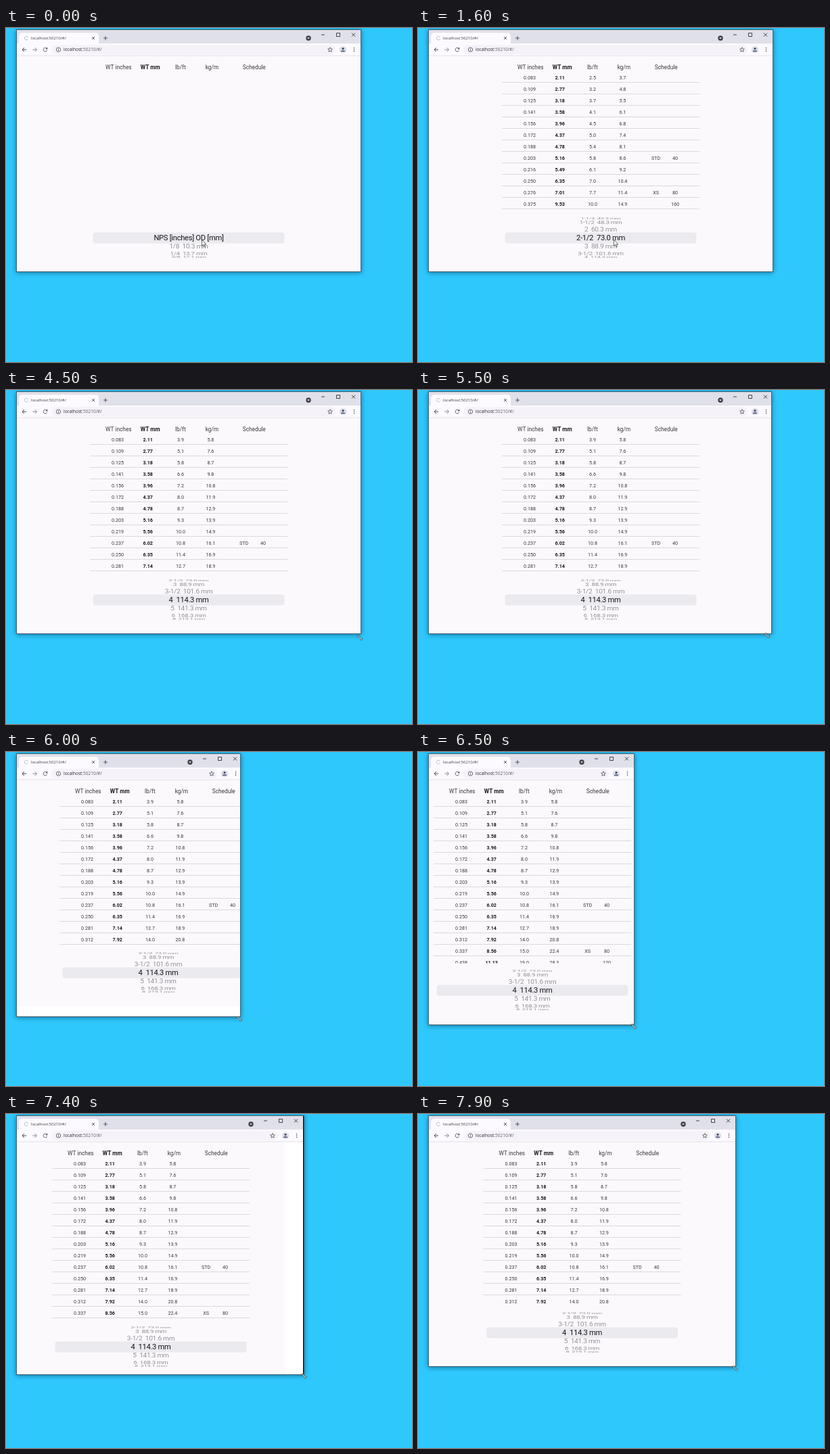
An HTML page with a canvas that plays this animation: 600x494 px, repeating every 8000 ms.

```html
<!DOCTYPE html>
<html lang="en">
<head>
<meta charset="utf-8">
<title>Pipe sizes</title>
<style>
html, body { margin: 0; width: 100%; height: 100%; overflow: hidden; background: #2fc8fd; }
canvas { display: block; }
</style>
</head>
<body>
<canvas id="stage" width="600" height="494"></canvas>
<script>
const ctx = document.getElementById('stage').getContext('2d');
const LOOP = 8000, STEP = 100, LEFT = 16, TOP = 3, BAR = 41;
const UI = '"Open Sans", "Noto Sans", sans-serif', APP = 'Roboto, sans-serif';

// [time, values...]
const corner = [[5490, 524, 360], [5500, 522, 360], [5510, 515, 360], [5600, 497, 362], [5700, 468, 369],
  [5800, 434, 376], [5900, 381, 384], [6000, 346.4, 391], [6100, 330, 396], [6300, 322, 402],
  [6600, 318, 403], [6900, 320, 402], [7000, 345, 400], [7100, 393, 397], [7200, 412, 394],
  [7300, 427, 390], [7500, 453, 380], [7700, 469, 373]];
const pointer = [[3500, 289, 313], [3900, 405, 345], [4300, 519, 367], [4400, 523, 363],
  [4600, 524, 364], [4900, 525, 364], [5300, 524, 363]];
const scroll = [[0, 0], [600, 7], [1000, 7], [1100, 10.3], [1200, 10], [2800, 10], [2900, 13]];

const sizes = `NPS [inches] OD [mm]|1/8  10.3|1/4  13.7|3/8  17.1|1/2  21.3|3/4  26.7|1  33.4|1-1/4  42.2|1-1/2  48.3
|2  60.3|2-1/2  73.0|3  88.9|3-1/2  101.6|4  114.3|5  141.3|6  168.3|8  219.1`.split('|')
  .map((s, i) => i ? s.trim() + ' mm' : s);

// inches / label / schedule / kg per metre where it differs from the rule
const thin = '0.083 0.109 0.125 0.141 0.156 0.172 0.188 ';
const small = ['', '0.068 0.095', '0.088 0.119', '0.091 0.126', '0.109 0.147 0.188 0.294',
  '0.113 0.154 0.219 0.308', '0.133 0.179 0.250 0.358', '0.140 0.191 0.250 0.382'];
const smallTags = ['/STD/40', '/XS/80', '//160', '/XXS'];
const walls = small.map(s => s.split(' ').filter(Boolean).map((w, i) => w + smallTags[i]));
walls[10] = (thin + '0.203/STD/40 0.216 0.250 0.276/XS/80 0.375//160 0.552/XXS').split(' ');
walls[13] = (thin + '0.203 0.219 0.237/STD/40 0.250 0.281 0.312 0.337/XS/80/22.4 0.438//120/28.3 0.531//160').split(' ');

function at(keys, t) {
  const n = keys.findIndex(k => k[0] > t);
  if (n === 0) return keys[0].slice(1);
  if (n < 0) return keys[keys.length - 1].slice(1);
  const a = keys[n - 1], b = keys[n], f = (t - a[0]) / (b[0] - a[0]);
  return a.slice(1).map((v, i) => v + (b[i + 1] - v) * f);
}

function rect(x, y, x2, y2, color) {
  ctx.fillStyle = color;
  ctx.fillRect(x, y, x2 - x, y2 - y);
}

function round(x, y, w, h, r, color) {
  ctx.fillStyle = color;
  ctx.beginPath();
  ctx.roundRect(x, y, w, h, r);
  ctx.fill();
}

function text(s, x, y, font, color, align = 'center') {
  ctx.font = font;
  ctx.fillStyle = color;
  ctx.textAlign = align;
  ctx.fillText(s, x, y);
}

function icon(x, y, d, color, width = 1, fill) {
  const p = new Path2D(d);
  ctx.save();
  ctx.translate(x, y);
  if (fill) { ctx.fillStyle = fill; ctx.fill(p); }
  ctx.strokeStyle = color;
  ctx.lineWidth = width;
  ctx.stroke(p);
  ctx.restore();
}

function disc(x, y, r, color) {
  ctx.fillStyle = color;
  ctx.beginPath();
  ctx.arc(x, y, r, 0, 7);
  ctx.fill();
}

function ring(x, y, r, color, from = 0, to = 6.3) {
  ctx.strokeStyle = color;
  ctx.lineWidth = .8;
  ctx.beginPath();
  ctx.arc(x, y, r, from, to);
  ctx.stroke();
}

function clip(x, y, x2, y2) {
  ctx.save();
  ctx.beginPath();
  ctx.rect(x, y, x2 - x, y2 - y);
  ctx.clip();
}

function table(cx, bottom, n) {
  const head = `8.3px ${APP}`, cell = `7.2px ${APP}`, ink = '#3a393d';
  text('WT inches', cx - 103.7, 61, head, ink);
  text('WT mm', cx - 56.7, 61, 'bold ' + head, '#19181c');
  text('lb/ft', cx - 12.2, 61, head, ink);
  text('kg/m', cx + 34.4, 61, head, ink);
  text('Schedule', cx + 96.7, 61, head, ink);
  const od = parseFloat(sizes[n].split('  ')[1]);
  clip(LEFT, 64, 600, bottom);
  walls[n].forEach((row, i) => {
    const [inch, tag = '', sched = '', kg] = row.split('/');
    const y = 75.6 + 17 * i, mm = (inch * 25.4 + 1e-6).toFixed(2);
    text(inch, cx - 105, y, cell, ink);
    text(mm, cx - 60.3, y, 'bold ' + cell, '#19181c');
    text((10.69 * (od / 25.4 - inch) * inch).toFixed(1), cx - 12, y, cell, ink);
    text(kg || (.02469 * (od - mm) * mm).toFixed(1), cx + 32.4, y, cell, ink);
    text(tag, cx + 81.7, y, cell, ink);
    text(sched, cx + 110, y, cell, ink);
    rect(cx - 146, 80 + 17 * i, cx + 146, 81 + 17 * i, '#dad9dd');
  });
  ctx.restore();
}

function wheel(cx, cy, pos) {
  round(cx - 141.5, cy - 7.5, 283, 16, 4, '#ebeaee');
  ctx.letterSpacing = '-0.3px';
  sizes.forEach((s, i) => {
    const a = (i - pos) * .44, c = Math.cos(a);
    if (Math.abs(a) > 1.45) return;
    const mid = Math.abs(i - pos) < .5;
    ctx.save();
    ctx.translate(cx, cy + 29.5 * Math.sin(a));
    ctx.scale(1, .2 + .8 * c);
    text(s, 0, 4, `${mid ? 11.2 : 8.9 + 1.4 * c}px ${APP}`, mid ? '#161519' : '#929196');
    ctx.restore();
  });
  ctx.letterSpacing = '0px';
}

function chrome(r) {
  const dark = '#4a4a50';
  rect(LEFT, TOP, r, 24, '#e0e0ea');
  rect(LEFT, 23, r, BAR, '#fcfafe');
  rect(LEFT, BAR - .5, r, BAR + .5, '#e4e2e8');
  round(19, 7, 118, 17, [5, 5, 0, 0], '#fcfafe');
  ring(30, 15, 2.7, '#b4b4bc', .4, 5.9);
  text('localhost:50210/#/', 37, 17.2, `5.97px ${UI}`, '#3c3c42', 'left');
  icon(129, 15, 'M-2-2L2 2M2-2L-2 2', dark, .9);
  icon(147, 15, 'M-3 0H3M0-3V3', dark, .9);
  disc(r - 77, 15, 3.7, '#404046');
  icon(r - 77, 15, 'M-1.6-.8H1.6L0 1.2Z', '#fff', .2, '#fff');
  icon(r - 55.5, 10, 'M-2.5 0H2.5', '#333', .9);
  icon(r - 33, 10, 'M-2.5-2.5H2.5V2.5H-2.5Z', '#333', .9);
  icon(r - 10.5, 10, 'M-2.5-2.5L2.5 2.5M2.5-2.5L-2.5 2.5', '#333', .9);

  round(67, 25, r - 104, 14, 7, '#f5f3f9');
  icon(27, 32, 'M3.2 0H-3M0-3L-3 0L0 3', dark);
  icon(42.5, 32, 'M-3.2 0H3M0-3L3 0L0 3', '#88888e');
  ring(58, 32, 2.9, dark, .3, 5.4);
  icon(58, 32, 'M3.2-3.4V-.8H.6Z', dark, .2, dark);
  ring(77.5, 32, 3.2, dark);
  icon(77.5, 32, 'M0-1.9V-1M0-.4V1.9', dark, .8);
  const font = `6.52px ${UI}`;
  text('localhost', 85, 34.4, font, '#2c2c32', 'left');
  text(':50210/#/', 85 + ctx.measureText('localhost').width, 34.4, font, '#606066', 'left');
  icon(r - 45, 32, 'M0-3.4L1-1.1L3.4-.9L1.6.7L2.1 3.1L0 1.9L-2.1 3.1L-1.6.7L-3.4-.9L-1-1.1Z', dark, .8);
  disc(r - 26, 32, 5.3, '#dddfe9');
  disc(r - 26, 30.5, 1.6, '#3d4668');
  icon(r - 26, 32, 'M-3 2.8V2Q0 .3 3 2V2.8Z', '#3d4668', .2, '#3d4668');
  for (const dy of [-2.6, 0, 2.6]) disc(r - 9.5, 32 + dy, .75, dark);
}

function draw(t) {
  const [r, b] = at(corner, t);
  const [cr] = at(corner, t - 8);
  const [lr, lb] = at(corner, t - 200).map(Math.round);
  const right = Math.round(r), bottom = Math.round(b), edge = Math.round(cr);
  const cx = (LEFT + lr) / 2, [pos] = at(scroll, t);

  rect(0, 0, 600, 494, '#2fc8fd');
  ctx.save();
  ctx.shadowColor = 'rgba(0,40,70,.55)';
  ctx.shadowBlur = 7;
  ctx.shadowOffsetY = 1;
  rect(15, 2, right + 1, bottom + 1, '#41606f');
  ctx.restore();

  clip(LEFT, TOP, right, bottom);
  rect(LEFT, TOP, right, bottom, '#000');
  rect(LEFT, TOP, edge, bottom, '#fff');
  clip(LEFT, BAR, lr, lb);
  rect(LEFT, BAR, lr, lb, '#fcf9fd');
  table(cx, lb - 89.5, walls[Math.round(pos)] ? Math.round(pos) : 10);
  wheel(cx, lb - 50, pos);
  ctx.restore();
  chrome(edge);
  ctx.restore();

  if (t < 4400) {
    const [x, y] = at(pointer, t);
    icon(x + .5, y, 'M0 0V9.4L2.1 7.5L3.6 11L5 10.4L3.6 7H6.4Z', '#444', .8, '#fff');
  } else {
    const [x, y] = t < 5490 ? at(pointer, t) : at(corner, t + 8);
    icon(x - .3, y + 2.8, 'M-3.5-3H-.8L-1.6-2.1L2.4 1.6L3.2.8V3.4H.6L1.4 2.5L-2.5-1.3L-3.5-.4Z', '#333', .7, '#fff');
  }
}

const start = performance.now();
function tick() {
  const t = (performance.now() - start) % LOOP;
  draw(Math.floor(t / STEP) * STEP);
  requestAnimationFrame(tick);
}
tick();
</script>
</body>
</html>
```
